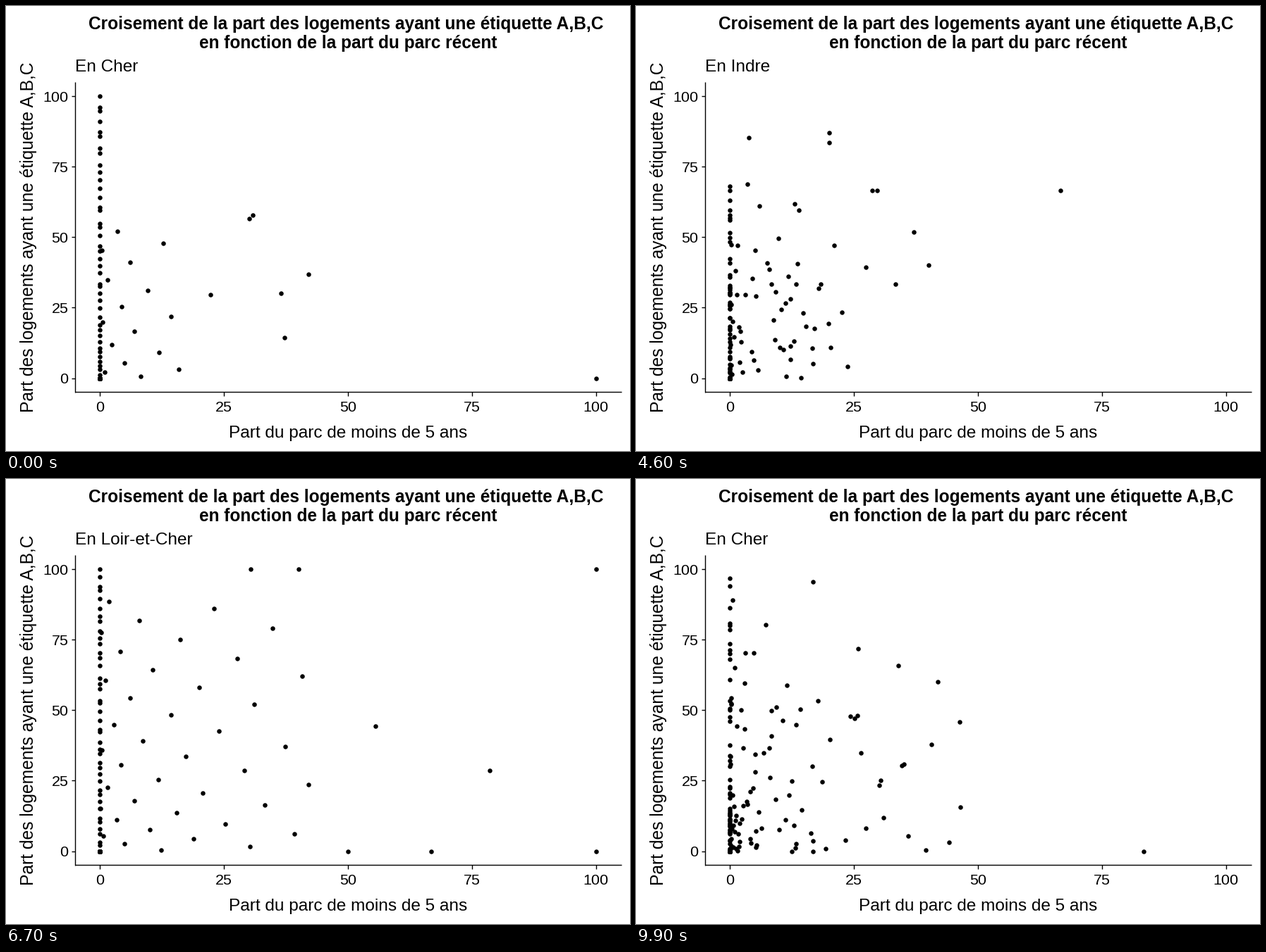
Recreate the animation shown at these times as a matplotlib script. Size 885x632 px, loop 10 s.

```python
import numpy as np
import matplotlib.pyplot as plt
from matplotlib.animation import FuncAnimation

W, H, DPI = 885, 632, 100
PX = 72 / DPI
FRAMES, STEPS = 100, 6
# First moving frame of each transition; the last one closes the loop
BEGINS = [min(11 + 17 * i, FRAMES - STEPS + 1) for i in range(6)]

rng = np.random.default_rng(18)


def zero_line(n, bend):
    """Communes without recent housing: uneven steps from 0 to 100."""
    u = np.linspace(0, 1, n)
    u[1:-1] += rng.uniform(-.4, .4, n - 2) / (n - 1)
    return np.column_stack([np.zeros(n), 100 * u ** bend])


def cloud(n, reach, top, bend):
    """Communes with some recent housing, thinning out to the right."""
    i = np.arange(n)
    u = (i + rng.random(n)) / n
    v = (i * .618034 + rng.random()) % 1
    return np.column_stack([reach * u ** 1.7, top * v ** bend])


def rows(total, line, spread, far):
    """All communes in row order; rows of two states are paired by index."""
    far = np.array(far, float)
    body = np.vstack([zero_line(*line), cloud(*spread)])
    empty = np.zeros((total - len(body) - len(far), 2))
    return far, body, empty


def far_first(far, body, empty):
    return np.vstack([far, rng.permutation(np.vstack([body, empty]))])


def empty_first(far, body, empty):
    return np.vstack([empty, far, rng.permutation(body)])


NAMES = ["Cher", "Eure-et-Loir", "Indre", "Indre-et-Loire", "Loir-et-Cher", "Loiret"]

states = [
    far_first(*rows(150, (40, 1.2), (17, 17, 56, 1.4), [
        (22.3, 29.6), (30.1, 56.6), (30.8, 57.8), (36.5, 30.1),
        (37.2, 14.3), (42.1, 36.9), (100, 0)])),
    empty_first(*rows(180, (36, 1), (41, 37, 82, 1.2), [
        (16.3, 93), (42.1, 58), (50, 80), (55.3, 79), (76.7, 40),
        (100, 0), (100, 100)])),
    far_first(*rows(150, (46, 1.3), (25, 38, 80, 1.2), [
        (19.5, 92.6), (41, 59), (42.9, 100), (44.5, 100), (55.6, 77.8),
        (60, 60), (100, 100)])),
    empty_first(*rows(200, (52, 1.1), (58, 44, 95, 1.4), [
        (17.6, 100), (25, 100), (40.1, 100), (55, 100), (60, 100), (100, 100),
        (52.3, 91.3), (51, 52.8), (57.2, 43), (50, 12.5)])),
    far_first(*rows(175, (41, 1.1), (40, 43, 90, 1.4), [
        (30.4, 100), (40.1, 100), (100, 100), (55.6, 44.4), (78.6, 28.6),
        (50, 0), (66.7, 0), (100, 0)])),
    empty_first(*rows(200, (45, 1.2), (70, 50, 72, 1.5), [
        (21.4, 100), (100, 100), (56.1, 72.1), (66.7, 66.6), (77.4, 54.7),
        (100, 16.8), (64, 4.1), (78.8, 6.1), (75, 0), (100, 0)])),
]


def points_at(state, step):
    """Paired rows glide evenly; surplus rows wait, then are gone."""
    old, new = states[state], states[(state + 1) % len(states)]
    n = min(len(old), len(new))
    moved = old[:n] + (new[:n] - old[:n]) * step / STEPS
    return np.vstack([moved, old[n:]])


def to_px(p):
    p = np.asarray(p, float)
    return np.column_stack([133.3 + 7.035 * p[:, 0], 528.5 - 4.002 * p[:, 1]])


plt.rcParams["font.family"] = "Liberation Sans"
fig = plt.figure(figsize=(W / DPI, H / DPI), dpi=DPI, facecolor="white")
ax = fig.add_axes([0, 0, 1, 1])
ax.set_xlim(0, W)
ax.set_ylim(H, 0)
ax.axis("off")


def label(x, y, s, size, **kw):
    kw = {"ha": "center", "va": "baseline", **kw}
    return ax.text(x, y, s, fontsize=size * PX, color="black", **kw)


def rule(x, y):
    ax.plot(x, y, color="black", lw=1.4 * PX, solid_capstyle="butt")


label(481.7, 33, "Croisement de la part des logements ayant une étiquette A,B,C",
      24.55, weight="bold")
label(485.3, 60, "en fonction de la part du parc récent", 24.55, weight="bold")
label(485, 613, "Part du parc de moins de 5 ans", 24.4)
label(39, 328.3, "Part des logements ayant une étiquette A,B,C", 24.6,
      rotation=90, rotation_mode="anchor")
subtitle = label(98, 93, "", 24.4, ha="left")

rule([98.2, 98.2], [108, 549])
rule([98, 873], [548.3, 548.3])
for v in range(0, 101, 25):
    x, y = to_px([[v, v]])[0]
    rule([x, x], [548, 554])
    rule([92.5, 98.2], [y, y])
    label(x, 576, str(v), 21.5)
    label(88.3, y + 7.8, str(v), 21.5, ha="right")

dots = ax.scatter([], [], s=(6.5 * PX) ** 2, c="black", linewidths=0, zorder=3)


def draw(i):
    state = max(sum(b <= i for b in BEGINS) - 1, 0)
    step = max(i - BEGINS[state] + 1, 0)
    if step >= STEPS:
        state, step = state + 1, 0
    nearest = state + (step >= STEPS / 2)
    subtitle.set_text("En " + NAMES[nearest % len(NAMES)])
    dots.set_offsets(to_px(points_at(state, step)))
    return dots, subtitle


anim = FuncAnimation(fig, draw, frames=FRAMES, interval=100, repeat=True,
                     repeat_delay=0, init_func=lambda: draw(0))
plt.show()
```
